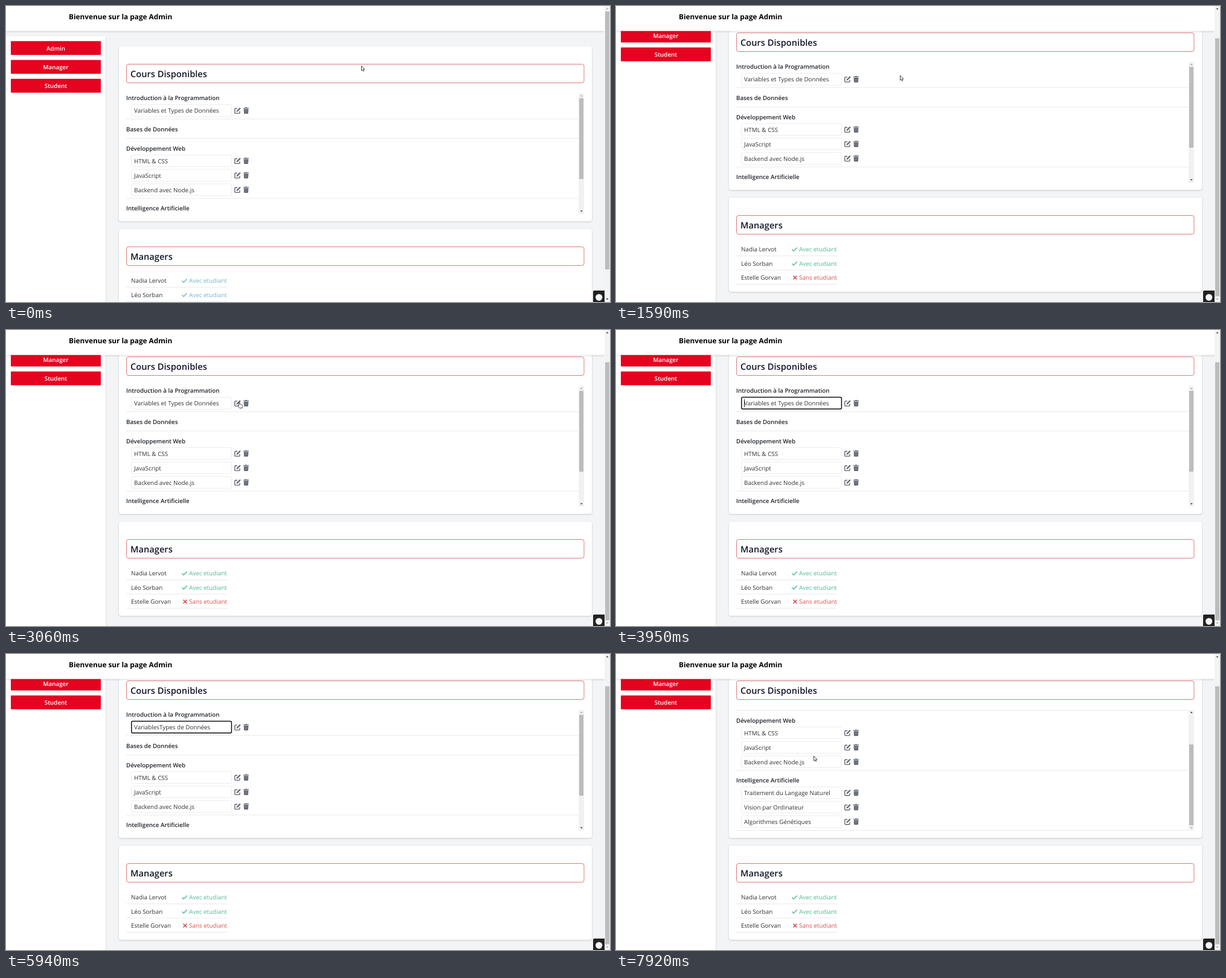
Recreate the animation shown at these times as an HTML page. Size 1000 by 491 pixels, loop 8 s.

```html
<!DOCTYPE html>
<html lang="fr">
<head>
<meta charset="utf-8">
<title>Page Admin</title>
<style>
  html, body { margin: 0; width: 100%; height: 100%; overflow: hidden; background: #f3f4f6; }
  svg { display: block; }
  #stage { width: 1000px; height: 491px; }
  text { font: 9.9px "Open Sans", "Noto Sans", sans-serif; fill: #333; text-rendering: geometricPrecision; }
  .top { font-size: 11.8px; font-weight: 700; fill: #000; }
  .title { font-size: 14.65px; font-weight: 600; fill: #111827; }
  .course { font-size: 9.75px; font-weight: 600; fill: #1f2328; }
  .button { font-size: 9.8px; font-weight: 600; fill: #fff; text-anchor: middle; }
  .panel { fill: #fff; filter: drop-shadow(0 1px 1.5px rgba(0, 0, 0, .16)); }
  .frame { fill: #fff; stroke: #e07a7c; }
  .input { fill: #fff; stroke: #ececee; }
  .line { stroke: #e9eaec; }
  .icon { fill: #616771; }
  .pen { fill: none; stroke: #616771; stroke-width: 1.4; }
  .mark { fill: none; stroke-width: 1.5; }
  .yes text { fill: var(--yes); }
  .yes .mark { stroke: var(--yes); }
  .no text { fill: #d9534f; }
  .no .mark { stroke: #cf4443; }
  .thumb { fill: #bcbcbc; }
</style>
</head>
<body>
<svg id="stage" viewBox="0 0 1000 491"></svg>
<script>
const LOOP = 8000, PAGE_MAX = 52, LIST_MAX = 74;
const LESSON = 'Variables et Types de Données';
const FOCUS = 3530, MOVE_START = 4150, MOVE_END = 5060, CUT = 13;
const DELETES = [5200, 5280, 5360, 5430];

// time, x, y of the pointer
const PATH = [
  [0, 588, 99], [160, 588, 99], [410, 568, 95], [1050, 567, 95], [1590, 470, 115],
  [1830, 470, 115], [2330, 385, 119], [6940, 385, 119], [7190, 340, 160],
  [7340, 327, 169], [LOOP, 327, 169]
];

const rect = (x, y, w, h, attrs) => `<rect x="${x}" y="${y}" width="${w}" height="${h}" ${attrs}/>`;
const label = (x, mid, text, cls = '', lift = 3.7) => `<text x="${x}" y="${mid + lift}" class="${cls}">${text}</text>`;
const line = (y, x2) => `<path class="line" d="M199 ${y}H${x2}"/>`;
const arrow = (id, x, y, dir) => `<path id="${id}" d="M${x - 2} ${y + dir}h4l-2 ${-2.4 * dir}z"/>`;

const button = (y, text) => rect(8, y - 11.7, 149, 23, 'rx="1" fill="#e60320"') + label(82.5, y, text, 'button');

const icons = y => `
  <g transform="translate(378 ${y - 5.5})">
    <path class="pen" d="M5 2H2Q.8 2 .8 3.2V9Q.8 10.2 2 10.2H7.8Q9 10.2 9 9V6.5"/>
    <path class="icon" d="M3.4 7.8L4 5.6 8.6 1Q9.2 .4 9.8 1L10.2 1.4Q10.8 2 10.2 2.6L5.6 7.2z"/>
  </g>
  <g transform="translate(393 ${y - 5.5})">
    <path class="icon" d="M0 1H2.7L3.3 .2H5.7L6.3 1H9V2.3H0zM.6 3H8.4L8 9.8Q7.9 10.8 6.9 10.8H2.1Q1.1 10.8 1 9.8z"/>
    <path d="M2.8 4.5V9.2M4.5 4.5V9.2M6.2 4.5V9.2" stroke="#8d929a" stroke-width=".6"/>
  </g>`;

const lesson = (y, text, id) => `
  ${rect(207.5, y - 10, 166, 19.5, `rx="2" class="input"`)}
  ${id ? `<text id="${id}" x="212" y="${y + 3.7}"></text>` : label(212, y, text)}
  ${icons(y - .3)}`;

const course = (y, name, lessons, end) =>
  label(199, y, name, 'course') +
  lessons.map((text, i) => lesson(y + 21 + 24 * i, text, text === LESSON && 'edited')).join('') +
  line(end, 948);

const manager = (y, name, busy) => `
  ${label(207, y, name)}
  <g class="${busy ? 'yes' : 'no'}">
    <path class="mark" d="${busy ? `M291.5 ${y + .3}l2.6 2.7 5.6-5.8` : `M293.5 ${y - 3}l6 6m0-6l-6 6`}"/>
    ${label(303, y, busy ? 'Avec etudiant' : 'Sans etudiant')}
  </g>
  ${line(y + 11, 366)}`;

const card = (y, h, title) =>
  rect(187, y, 783, h, 'rx="4" class="panel"') +
  rect(199.5, y + 29.5, 757.5, 31, 'rx="3.5" class="frame"') +
  label(206, y + 46, title, 'title', 5.2);

const stage = document.getElementById('stage');
stage.innerHTML = `
  ${rect(0, 0, 1000, 491, 'fill="#f3f4f6"')}
  <g id="page">
    ${rect(0, 50, 165, 600, 'class="panel"')}
    ${button(70, 'Admin')}${button(101.3, 'Manager')}${button(132.5, 'Student')}
    ${card(67, 290, 'Cours Disponibles')}
    <svg id="list" x="199" y="145" width="749" height="200">
      ${course(152.7, 'Introduction à la Programmation', [LESSON], 187.5)}
      ${course(204, 'Bases de Données', [], 219.5)}
      ${course(236, 'Développement Web', ['HTML &amp; CSS', 'JavaScript', 'Backend avec Node.js'], 319)}
      ${course(335.3, 'Intelligence Artificielle',
        ['Traitement du Langage Naturel', 'Vision par Ordinateur', 'Algorithmes Génétiques'], 418.5)}
      ${rect(207.8, 163.5, 165.6, 19.4, 'id="focus" rx="2" fill="none" stroke="#111" stroke-width="1.5"')}
      ${rect(212, 167, .9, 13, 'id="caret"')}
    </svg>
    ${rect(948, 145, 9, 200, 'fill="#f1f1f1"')}
    ${rect(949, 153, 7, 134, 'id="listThumb" class="thumb"')}
    ${arrow('listUp', 952.7, 149, 1)}${arrow('listDown', 952.7, 340.3, -1)}
    ${card(370, 156, 'Managers')}
    ${manager(455.5, 'Nadia Lervot', true)}
    ${manager(479, 'Léo Sorban', true)}
    ${manager(502.5, 'Estelle Gorvan', false)}
  </g>
  ${rect(0, -5, 991, 46.5, 'class="panel"')}
  ${label(104, 17.5, 'Bienvenue sur la page Admin', 'top', 4.3)}
  ${rect(991, 0, 9, 491, 'fill="#f3f3f3"')}
  ${rect(992, 9, 7, 428, 'id="pageThumb" class="thumb"')}
  ${arrow('pageUp', 995.5, 4.5, 1)}${arrow('pageDown', 995.5, 486, -1)}
  <path d="M972 491V474q0-2 2-2H991V491z" fill="#222"/>
  <circle cx="981.7" cy="483.3" r="5.6" fill="#f5f5f5"/>
  <g id="pointer" stroke="#222" stroke-width=".8" fill="#fff" stroke-linejoin="round">
    <path id="arrow" d="M.5 .3V8.2L2.3 6.6 3.5 9.3 4.8 8.7 3.6 6.1H6z"/>
    <path id="hand" d="M.6 .9Q1.3 -.1 2 .9V4L3.4 4.3 5.8 5Q6.7 5.4 6.6 6.4L6 10.5H1.8L-1.3 6.7Q-1.4 5.6 -.3 5.9L.6 6.6z"/>
  </g>`;

const $ = id => document.getElementById(id);
const set = (id, name, value) => $(id).setAttribute(name, value);
const show = (id, on) => set(id, 'visibility', on ? 'visible' : 'hidden');
const progress = (t, from, to) => Math.min(1, Math.max(0, (t - from) / (to - from)));
const ease = p => p * p * (3 - 2 * p);
const arrowFill = active => active ? '#444' : '#a8a8a8';

function pointerAt(t) {
  const i = PATH.findIndex(point => point[0] > t);
  const [t0, x0, y0] = PATH[i - 1], [t1, x1, y1] = PATH[i];
  const p = ease(progress(t, t0, t1));
  return [x0 + (x1 - x0) * p, y0 + (y1 - y0) * p];
}

function drawScroll(t) {
  const page = PAGE_MAX * ease(progress(t, 1130, 1480));
  const list = LIST_MAX * ease(progress(t, 7620, 7900));
  set('page', 'transform', `translate(0 ${-page})`);
  set('list', 'viewBox', `199 ${145 + list} 749 200`);
  set('pageThumb', 'y', 9 + 44.5 * page / PAGE_MAX);
  set('listThumb', 'y', 153 + 49 * list / LIST_MAX);
  set('pageUp', 'fill', arrowFill(page > 0));
  set('pageDown', 'fill', arrowFill(page < PAGE_MAX));
  set('listUp', 'fill', arrowFill(list > 0));
  set('listDown', 'fill', arrowFill(list < LIST_MAX));
  stage.style.setProperty('--yes', page ? '#4fb99b' : '#76b3cb');
}

function drawEdit(t) {
  const cuts = DELETES.filter(time => time <= t);
  const caret = Math.round(CUT * progress(t, MOVE_START, MOVE_END)) - cuts.length;
  const field = $('edited');
  field.textContent = cuts.length ? LESSON.slice(0, caret) + LESSON.slice(CUT) : LESSON;
  const lastKey = cuts.at(-1) ?? (t < MOVE_START ? FOCUS : Math.min(t, MOVE_END));
  set('caret', 'x', 212 + (caret ? field.getSubStringLength(0, caret) : 0));
  show('focus', t >= FOCUS);
  show('caret', t >= FOCUS && (t - lastKey) % 1000 < 500);
}

function drawPointer(t) {
  const [x, y] = pointerAt(t);
  const visible = t < 3950 || t >= 6940;
  const onIcon = t < 3950 && x < 403;
  set('pointer', 'transform', `translate(${x} ${y})`);
  show('arrow', visible && !onIcon);
  show('hand', visible && onIcon);
}

function draw() {
  const t = performance.now() % LOOP;
  drawScroll(t);
  drawEdit(t);
  drawPointer(t);
  requestAnimationFrame(draw);
}
draw();
</script>
</body>
</html>
```
